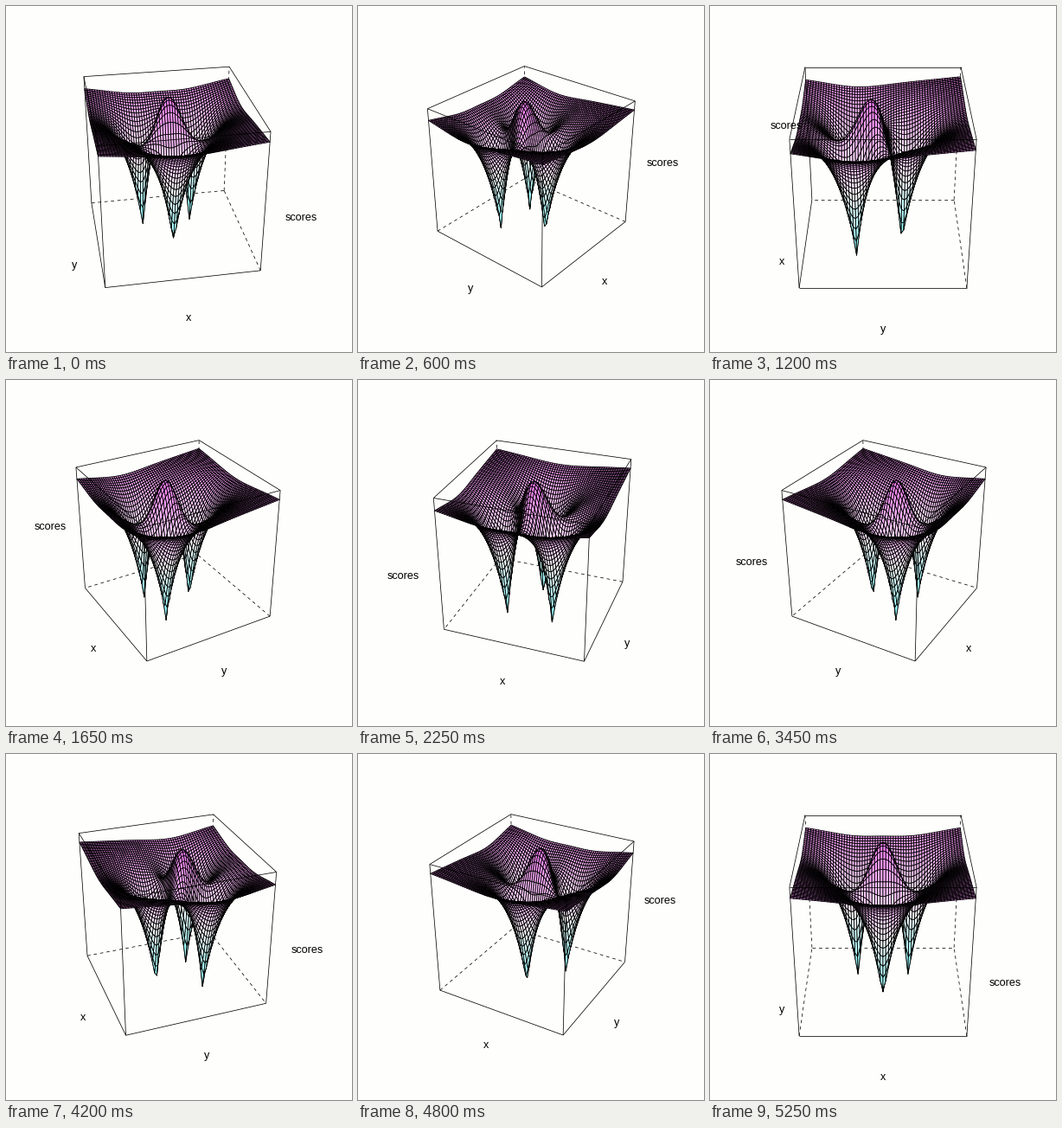
These frames come from a looping animation (400 by 400 pixels, 5.4 s). A matplotlib script:

```python
import numpy as np
import matplotlib.pyplot as plt
from matplotlib.animation import FuncAnimation
from matplotlib.collections import LineCollection, PolyCollection

SIZE, FRAMES, STEP_MS = 400, 36, 150
PX = 0.72                      # one pixel in points at 100 dpi
TILT = np.radians(60)
FIT, ZOOM, EYE = 319.2, 0.8, 5.0
CENTER = np.array([200, 199.5])
LABEL_DIST = 1.34
BG = "#fefefc"


def surface(n=61):
    """Three cusped wells on an equilateral triangle around a smooth peak."""
    x, y = np.meshgrid(np.linspace(-3, 3, n), np.linspace(-3, 3, n))
    wells = [(-1, 1), (1, 1), (0, 1 - np.sqrt(3))]
    r = np.hypot(x, y - 1 + 1 / np.sqrt(3))
    pull = sum(np.exp(-2 * np.hypot(x - a, y - b) / 0.65) for a, b in wells)
    z = 0.02 * r + 0.434 * np.exp(-r**2 / (2 * 0.65**2)) - 0.953 * np.sqrt(pull)
    z = (z - z.min()) / (z.max() - z.min()) - 0.5
    return np.stack([x / 6, y / 6, z], axis=-1)


def cyan_magenta(t):
    """Pale cyan through white to pale magenta, t from 0 to 1."""
    low = np.clip(0.5 - t, 0, 0.5)
    high = np.clip(t - 0.5, 0, 0.5)
    return np.stack([1 - low, 1 - high, np.ones_like(t)], axis=-1)


def spin(p, theta):
    c, s = np.cos(theta), np.sin(theta)
    x, y, z = np.moveaxis(np.asarray(p, float), -1, 0)
    return np.stack([x * c - y * s, x * s + y * c, z], axis=-1)


def project(p, theta):
    x, y, z = np.moveaxis(spin(p, theta), -1, 0)
    c, s = np.cos(TILT), np.sin(TILT)
    w = EYE + y * s - z * c
    return np.stack([x / w, (y * c + z * s) / w], axis=-1)


CORNERS = np.array([(x, y, z) for x in (-.5, .5) for y in (-.5, .5) for z in (-.5, .5)])
EDGES = [(i, j) for i in range(8) for j in range(i + 1, 8)
         if np.abs(CORNERS[i] - CORNERS[j]).sum() == 1]
NEAREST = [(-1, -1), (-1, 1), (1, 1), (1, -1)]

grid = surface()
quads = np.stack([grid[:-1, :-1], grid[:-1, 1:], grid[1:, 1:], grid[1:, :-1]], axis=2)
quads = quads.reshape(-1, 4, 3)
centers = quads.mean(axis=1)
colors = cyan_magenta(centers[:, 2] + 0.5)


def make_view(theta):
    """Map to pixels, with the rotated box fitted to the panel."""
    box = project(CORNERS, theta)
    lo, hi = box.min(axis=0), box.max(axis=0)
    scale, mid = FIT / (hi - lo).max(), (lo + hi) / 2

    def view(p):
        q = scale * (ZOOM * project(p, theta) - mid)
        return CENTER + q * (1, -1)
    return view


fig = plt.figure(figsize=(4, 4), dpi=100, facecolor=BG)
ax = fig.add_axes([0, 0, 1, 1])
ax.set(xlim=(0, SIZE), ylim=(SIZE, 0))
ax.axis("off")

thin = 0.75 * PX
hidden = LineCollection([], colors="k", linewidths=thin, linestyles=[(0, (5, 5))], zorder=1)
mesh = PolyCollection([], edgecolors="k", linewidths=0.85 * PX, zorder=2)
shown = LineCollection([], colors="k", linewidths=thin, zorder=3)
for artist in (hidden, mesh, shown):
    ax.add_collection(artist, autolim=False)
labels = [ax.text(0, 0, s, family="Liberation Sans", size=12.6 * PX,
                  ha="center", va="center", zorder=4) for s in ("x", "y", "scores")]


def draw(i):
    deg = 10 * (i + 1)
    theta = np.radians(deg % 360)
    view = make_view(theta)

    order = np.argsort(-spin(centers, theta)[:, 1], kind="stable")
    mesh.set_verts(view(quads[order]))
    mesh.set_facecolor(colors[order])

    sx, sy = NEAREST[deg // 90 % 4]
    far = [(-sx / 2, -sy / 2, -.5)]
    if deg % 360 == 0:         # seen head-on, both rear corners are equally far
        far.append((sx / 2, -sy / 2, -.5))
    is_far = [tuple(c) in far for c in CORNERS]
    box = view(CORNERS)
    hidden.set_segments([box[[a, b]] for a, b in EDGES if is_far[a] or is_far[b]])
    shown.set_segments([box[[a, b]] for a, b in EDGES if not (is_far[a] or is_far[b])])

    spots = np.array([(0, sy, -1), (sx, 0, -1), (1, -sx * sy, 0)]) * LABEL_DIST / 2
    for label, pos in zip(labels, view(spots) + (0, 1)):
        label.set_position(pos)
    return [hidden, mesh, shown, *labels]


anim = FuncAnimation(fig, draw, frames=FRAMES, interval=STEP_MS, repeat=True, repeat_delay=0)
plt.show()
```
